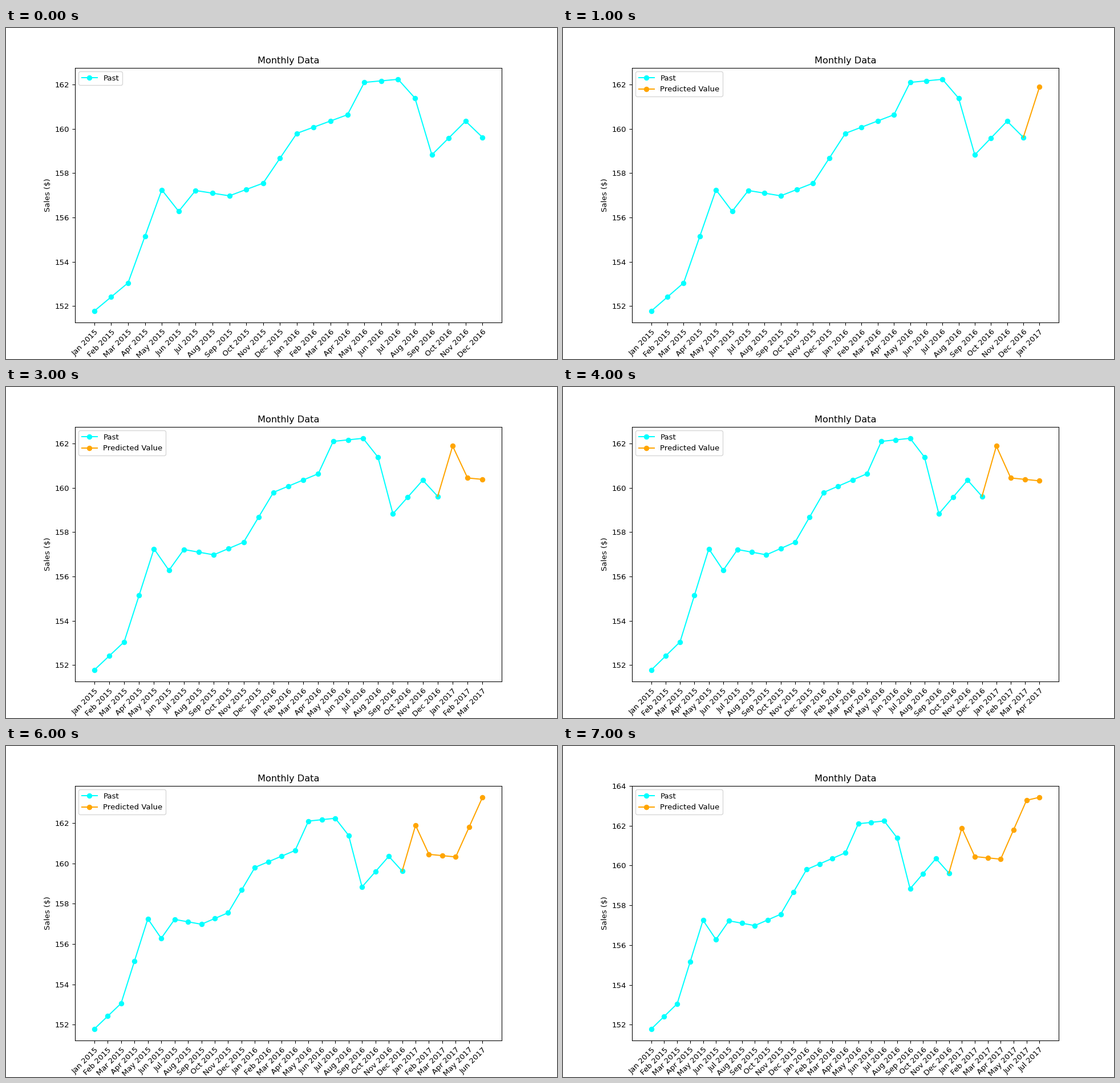
These frames come from a looping animation (966 by 580 pixels, 8000 ms). A matplotlib script:

```python
import numpy as np
import matplotlib.pyplot as plt
from matplotlib.animation import FuncAnimation

W, H = 966, 580
DPI = W / 10
PAST_COUNT, STEPS = 24, 7
MONTHS = "Jan Feb Mar Apr May Jun Jul Aug Sep Oct Nov Dec".split()

# Turning points (month, sales); months between them lie on straight runs.
TURNS = [(0, 151.78), (2, 153.05), (4, 157.25), (5, 156.28), (6, 157.22),
         (8, 156.98), (10, 157.55), (12, 159.8), (15, 160.64), (16, 162.1),
         (18, 162.24), (19, 161.39), (20, 158.83), (22, 160.35), (23, 159.62),
         (24, 161.89), (25, 160.45), (27, 160.32), (29, 163.28), (30, 163.43)]
months = np.arange(PAST_COUNT + STEPS)
sales = np.interp(months, *zip(*TURNS))
labels = [f"{MONTHS[m % 12]} {2015 + m // 12}" for m in months]

plt.rcParams["font.family"] = "DejaVu Sans"
# The tiny surplus keeps rounding from losing a pixel.
fig, ax = plt.subplots(figsize=((W + 1e-6) / DPI, (H + 1e-6) / DPI), dpi=DPI)
fig.subplots_adjust(left=0.125, right=0.9, bottom=0.11, top=0.88)


def plot_span(start, stop, *style, **kwargs):
    ax.plot(months[start:stop], sales[start:stop], *style, **kwargs)


def draw(step):
    """Show the past data and the first `step` predictions."""
    ax.clear()
    total = PAST_COUNT + step
    plot_span(0, PAST_COUNT, "o-", color="cyan", label="Past")
    if step:
        plot_span(PAST_COUNT, total, "o-", color="orange",
                  label="Predicted Value")
        plot_span(PAST_COUNT - 1, PAST_COUNT + 1, color="orange")

    ax.set_title("Monthly Data")
    ax.set_ylabel("Sales ($)")
    ax.set_xticks(months[:total], labels[:total],
                  rotation=45, ha="right", rotation_mode="anchor")
    ax.legend(loc="upper left")
    return []


anim = FuncAnimation(fig, draw, frames=STEPS + 1, interval=1000,
                     init_func=lambda: draw(0), repeat=True, repeat_delay=0)
plt.show()
```
